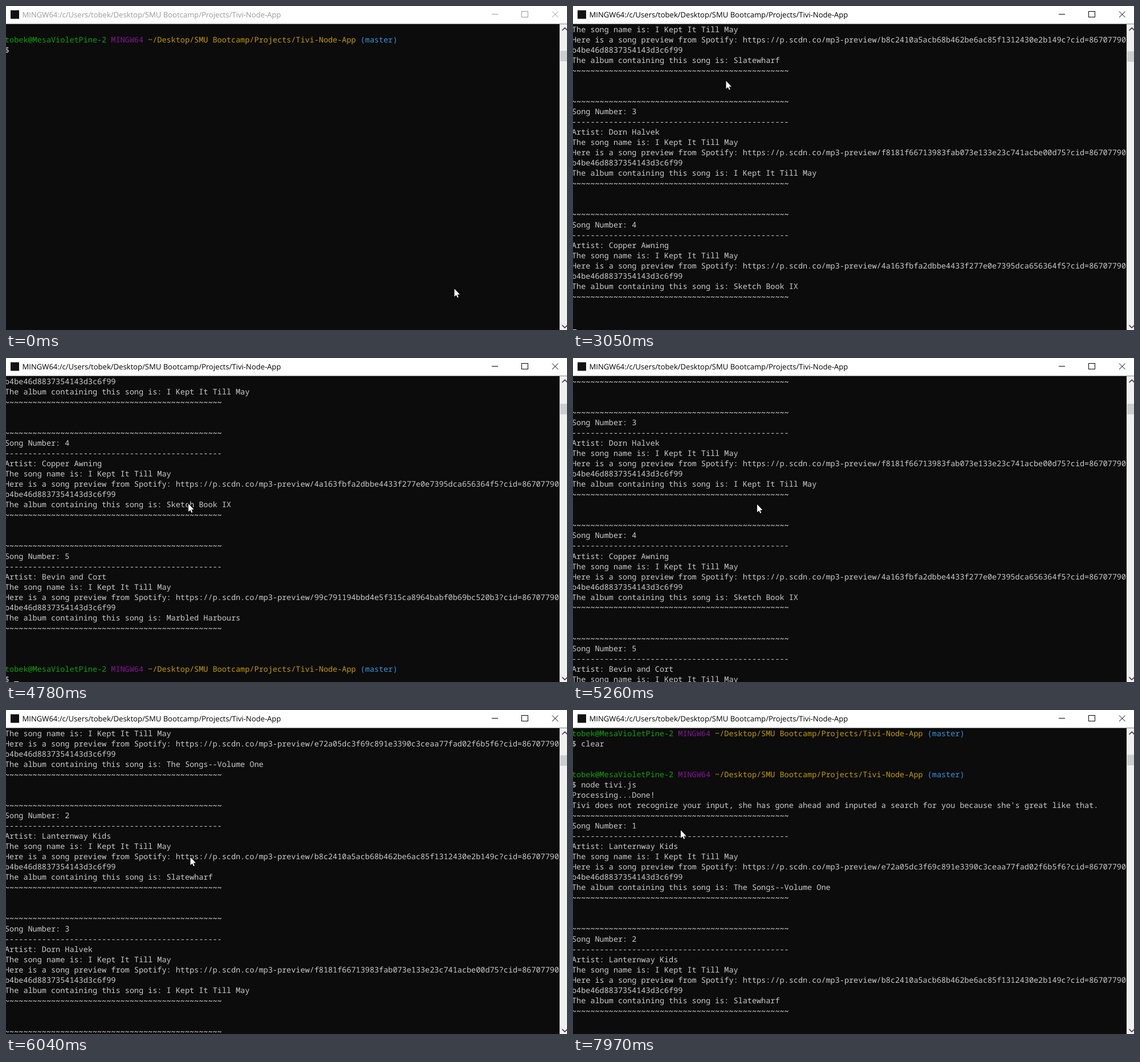
An HTML page with a canvas for the animation above (8 s loop, 984x569 px).

```html
<!DOCTYPE html>
<html lang="en">
<head>
<meta charset="utf-8">
<title>Terminal session</title>
<style>
  html, body { margin: 0; width: 100%; height: 100%; overflow: hidden; background: #0c0c0c; }
  canvas { display: block; }
</style>
</head>
<body>
<canvas id="stage" width="984" height="569"></canvas>
<script>
const ctx = document.getElementById('stage').getContext('2d');
ctx.textRendering = 'geometricPrecision';
const LOOP = 8000, COL = 8.1, ROW = 18.03, LEFT = -2, TOP = 32, ROWS = 30;
const MONO = '13.5px "Noto Sans Mono", monospace';
const FOCUS = 430, ENTER = 2590, DONE = 3510;

const PROMPT = [
  ['tobek@MesaVioletPine-2 ', '#13a10e'],
  ['MINGW64 ', '#881798'],
  ['~/Desktop/SMU Bootcamp/Projects/Tivi-Node-App ', '#c19c00'],
  ['(master)', '#3a96dd'],
];
const WAVE = '~'.repeat(47), DASH = '-'.repeat(47);

const songs = [
  ['Lanternway Kids', 'e72a05dc3f69c891e3390c3ceaa77fad02f6b5f6', 'The Songs--Volume One'],
  ['Lanternway Kids', 'b8c2410a5acb68b462be6ac85f1312430e2b149c', 'Slatewharf'],
  ['Dorn Halvek', 'f8181f66713983fab073e133e23c741acbe00d75', 'I Kept It Till May'],
  ['Copper Awning', '4a163fbfa2dbbe4433f277e0e7395dca656364f5', 'Sketch Book IX'],
  ['Bevin and Cort', '99c791194bbd4e5f315ca8964babf0b69bc520b3', 'Marbled Harbours'],
];
const songLines = ([artist, hash, album], i) => [
  WAVE,
  'Song Number: ' + (i + 1),
  DASH,
  'Artist: ' + artist,
  'The song name is: I Kept It Till May',
  `Here is a song preview from Spotify: https://p.scdn.co/mp3-preview/${hash}?cid=86707790`,
  'b4be46d8837354143d3c6f99',
  'The album containing this song is: ' + album,
  WAVE, '', '',
];

// Line 0 is the first row of the cleared screen; HISTORY lines lie above it.
const HISTORY = 3;
const lines = [
  PROMPT, '$ clear', '', '', PROMPT, '$ node tivi.js', 'Processing...Done!',
  "Tivi does not recognize your input, she has gone ahead and inputed a search for you because she's great like that.",
  ...songs.flatMap(songLines), '', PROMPT,
];

const typing = [[0, ''], [1030, 'n'], [1190, 'nod'], [1430, 'node'], [1500, 'node '],
  [1650, 'node l'], [1810, 'node tivi.js ']];
// time, line that holds the cursor
const output = [[0, 2], [ENTER, 3], [2750, 38], [3050, 49], [3310, 60], [3370, 61], [DONE, 62]];
// times of the wheel notches, three lines each
const notches = [4850, 5000, 5260, 5320, 5480, 5710, 5800, 6040, 6320, 6410, 6550, 6880];
const blinks = [FOCUS, 970, 1030, 2040, 2530, 4040, 4570];
// first step, last step, number of steps, end point
const moves = [[70, 500, 7, 268.5, 131.5], [4000, 4780, 9, 320, 256], [4850, 5090, 4, 323, 257],
  [5320, 5710, 3, 323.5, 258.5], [7190, 7420, 4, 263, 260], [7820, 7970, 3, 189, 211]];

const latest = (list, t) => list.filter(([time]) => time <= t).pop()[1];
const count = (times, t) => times.filter(time => time <= t).length;

function path(points, close) {
  ctx.beginPath();
  points.forEach(([x, y]) => ctx.lineTo(x, y));
  if (close) ctx.closePath();
}
function rect(x, y, w, h, color) {
  ctx.fillStyle = color;
  ctx.fillRect(x, y, w, h);
}

function drawLine(line, row) {
  const parts = typeof line === 'string' ? [[line, '#cccccc']] : line;
  const wave = line === WAVE;
  ctx.font = wave ? 'bold ' + MONO : MONO;
  let col = 0;
  for (const [text, color] of parts) {
    ctx.fillStyle = color;
    ctx.fillText(text, LEFT + col * COL, 46 + row * ROW + (wave ? 0.8 : 0));
    col += text.length;
  }
}

function drawTerminal(t, top) {
  const end = latest(output, t);
  const current = t < ENTER ? '$ ' + latest(typing, t) : t >= DONE ? '$ ' : '';
  for (let row = 0; row < ROWS && top + row <= end; row++) {
    const n = top + row;
    drawLine(n < end ? lines[n + HISTORY] : current, row);
  }
  if (count(blinks, t) % 2)
    rect(LEFT + current.length * COL, TOP + (end - top) * ROW + 13.2, COL, 4.6, '#ffffff');
}

function drawScrollbar(top) {
  rect(971, 32, 13, 537, '#f0f0f0');
  const shift = top > 20 ? 2 : top > 0 ? 1 : 0;
  rect(972, 78.6 + shift * 0.9, 12, 18.5, '#cdcdcd');
  ctx.strokeStyle = '#4a3048';
  ctx.lineWidth = 1.7;
  path([[975.5, 43], [980.2, 38.5], [985, 43]]);
  ctx.stroke();
  path([[975.5, 560.5], [980.2, 565], [985, 560.5]]);
  ctx.stroke();
}

function drawTitleBar(t) {
  const color = t < FOCUS ? '#999999' : '#000000';
  rect(0, 0, 984, 31.5, '#ffffff');
  rect(8, 7.5, 15, 15, '#111111');
  ctx.font = '13.07px "Open Sans", sans-serif';
  ctx.fillStyle = color;
  ctx.fillText('MINGW64:/c/Users/tobek/Desktop/SMU Bootcamp/Projects/Tivi-Node-App', 28.5, 20);
  ctx.strokeStyle = color;
  ctx.lineWidth = 1;
  path([[852, 14.5], [863, 14.5]]);
  ctx.stroke();
  ctx.strokeRect(904.5, 9.5, 11, 10);
  path([[958, 9.5], [968.5, 20]]);
  ctx.stroke();
  path([[968.5, 9.5], [958, 20]]);
  ctx.stroke();
}

function drawPointer(t) {
  let x = 786.5, y = 496.5;
  for (const [first, last, steps, toX, toY] of moves) {
    if (t < first) break;
    const step = Math.floor((t - first) / (last - first) * (steps - 1) + 1e-6) + 1;
    const k = Math.min(1, step / steps), ease = k * k * (3 - 2 * k);
    x += (toX - x) * ease;
    y += (toY - y) * ease;
  }
  ctx.save();
  ctx.translate(x, y);
  ctx.scale(0.9, 0.9);
  path([[0, 0], [0, 15.5], [3.6, 12.2], [6, 17.5], [8, 16.6], [5.8, 11.4], [10.5, 11]], true);
  ctx.strokeStyle = '#000000';
  ctx.lineWidth = 1.8;
  ctx.stroke();
  ctx.fillStyle = '#ffffff';
  ctx.fill();
  ctx.restore();
}

function draw(now) {
  const t = now % LOOP;
  const follow = Math.max(0, latest(output, t) - ROWS + 1);
  const top = follow - 3 * count(notches, t);
  rect(0, 0, 984, 569, '#0c0c0c');
  drawTerminal(t, top);
  drawScrollbar(top);
  drawTitleBar(t);
  drawPointer(t);
  requestAnimationFrame(draw);
}
requestAnimationFrame(draw);
</script>
</body>
</html>
```
